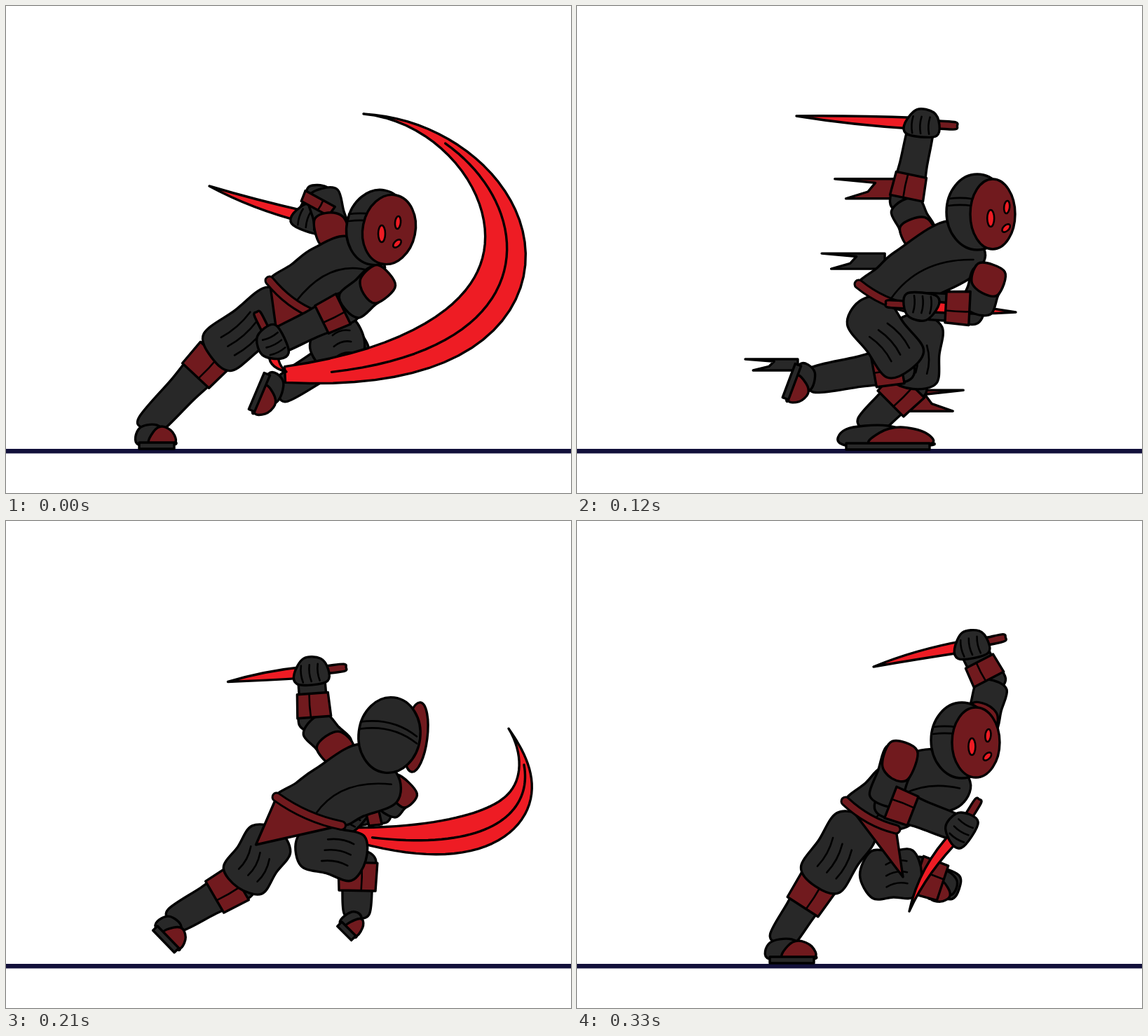
Write an HTML page with a canvas that moves like this. It is 806 by 695 pixels and loops after 0.36 s.

```html
<!DOCTYPE html>
<html lang="en">
<head>
<meta charset="utf-8">
<title>Running slash</title>
<style>
html, body { margin: 0; width: 806px; height: 695px; overflow: hidden; background: #fff; }
canvas { display: block; }
</style>
</head>
<body>
<canvas id="stage" width="806" height="695"></canvas>
<script>
const ctx = document.getElementById('stage').getContext('2d');
const STEP = 30;
const DARK = '#282828', MAROON = '#711a1e', RED = '#ee1c24';

// Joints of each key pose.
// head: centre, mask width, tilt    body: belt back, belt front, back, chest
// arms: shoulder, elbow, hand, blade tip    legs: hip, knee, heel, toe
// slash: where the trail begins on its arc, half width
const lunge = {
  head: [535, 316, 75, .2], body: [[376, 392], [440, 440], [438, 346], [515, 395]], sash: [385, 458],
  raised: [[468, 328], [452, 268], [433, 303], [290, 257]],
  low: [[535, 390], [490, 428], [380, 482], [400, 522]],
  legA: [[390, 428], [302, 494], [190, 628], [240, 628]],
  legB: [[450, 486], [500, 480], [372, 525], [350, 577]],
  slash: [0, 34], smear: 0
};
const stride = {
  head: [550, 335, 82, .2], body: [[380, 395], [470, 430], [440, 340], [525, 400]], sash: [402, 496],
  raised: [[475, 328], [442, 290], [420, 192], [293, 106]],
  low: [[546, 400], [515, 448], [405, 412], [383, 552]],
  legA: [[388, 428], [335, 494], [225, 507], [197, 560]],
  legB: [[452, 462], [500, 486], [551, 614], [624, 602]],
  slash: [.64, 15], smear: 0
};
const pass = {
  head: [576, 294, 64, 0], body: [[402, 397], [478, 432], [455, 350], [565, 385]], sash: [440, 425],
  raised: [[490, 328], [468, 284], [492, 168], [313, 157]],
  low: [[588, 382], [570, 432], [491, 428], [626, 437]],
  legA: [[412, 435], [468, 510], [315, 512], [297, 560]],
  legB: [[488, 455], [480, 535], [384, 629], [503, 629]],
  slash: [1, 0], smear: 1
};
const sweep = {
  head: [547, 302, 36, .2], body: [[382, 390], [485, 432], [432, 350], [555, 400]], sash: [318, 442],
  raised: [[476, 326], [438, 300], [433, 250], [296, 199]],
  low: [[560, 382], [540, 400], [500, 410], [490, 420]],
  legA: [[420, 461], [508, 463], [398, 537], [362, 588]],
  legB: [[372, 455], [295, 499], [191, 626], [259, 626]],
  slash: [0, 40], smear: 0
};
const reach = {
  head: [557, 309, 28, .05], body: [[390, 398], [472, 437], [450, 358], [560, 402]], sash: [395, 482],
  raised: [[475, 330], [443, 280], [437, 180], [337, 260]],
  low: [[570, 382], [540, 415], [490, 425], [480, 440]],
  legA: [[440, 460], [496, 500], [553, 614], [629, 603]],
  legB: [[385, 452], [380, 528], [234, 537], [227, 600]],
  slash: [.86, 11], smear: 0
};
const plant = {
  head: [564, 308, 49, 0], body: [[374, 411], [478, 437], [442, 335], [515, 390]], sash: [330, 456],
  raised: [[478, 315], [480, 270], [522, 190], [387, 208]],
  low: [[533, 388], [525, 446], [569, 420], [607, 518]],
  legA: [[412, 447], [455, 505], [367, 629], [524, 629]],
  legB: [[420, 490], [400, 530], [302, 530], [310, 586]],
  slash: [1, 0], smear: 1
};
const crouch = {
  head: [554, 313, 68, 0], body: [[383, 400], [455, 440], [440, 348], [548, 405]], sash: [465, 508],
  raised: [[575, 295], [592, 235], [562, 177], [423, 208]],
  low: [[463, 330], [438, 398], [547, 440], [474, 557]],
  legA: [[398, 435], [347, 512], [275, 627], [338, 627]],
  legB: [[420, 505], [480, 503], [520, 500], [500, 535]],
  slash: [1, 0], smear: 0
};

const mix = (a, b, t = .5) => typeof a === 'number' ? a + (b - a) * t
  : Array.isArray(a) ? a.map((v, i) => mix(v, b[i], t))
  : Object.fromEntries(Object.keys(a).map(k => [k, mix(a[k], b[k], t)]));

const steps = [
  lunge, mix(lunge, stride), stride, mix(stride, pass), pass, crouch,
  sweep, mix(sweep, reach), reach, mix(reach, plant), plant, crouch
];

// Cubic arcs of the two cuts, one for each half of the loop.
const arcs = [
  [[510, 154], [725, 170], [870, 505], [398, 526]],
  [[482, 193], [709, 152], [923, 510], [487, 446]]
];

const distance = (a, b) => Math.hypot(b[0] - a[0], b[1] - a[1]);

// Local axes along a→b: at(along, across) gives a point in pixels.
function frame(a, b) {
  const length = distance(a, b) || 1;
  const dx = (b[0] - a[0]) / length, dy = (b[1] - a[1]) / length;
  const at = (u, v = 0) => [a[0] + dx * u + dy * v, a[1] + dy * u - dx * v];
  return { length, dy, at };
}

function paint(path, fill, width = 3.4) {
  ctx.lineWidth = width;
  if (fill) { ctx.fillStyle = fill; ctx.fill(path); }
  ctx.stroke(path);
}

const polygon = (points, fill) => paint(new Path2D('M' + points.join('L') + 'Z'), fill);

function smooth(points, fill) {
  const n = points.length, p = i => points[(i + n) % n];
  const handle = (i, sign) => p(i).map((v, k) => v + sign * (p(i + 1)[k] - p(i - 1)[k]) / 6);
  const curves = points.map((_, i) => `C${handle(i, 1)} ${handle(i + 1, -1)} ${p(i + 1)}`);
  paint(new Path2D('M' + points[0] + curves.join('') + 'Z'), fill);
}

function line(a, control, b, width = 2.6) {
  paint(new Path2D(`M${a}Q${control} ${b}`), null, width);
}

function ellipse(x, y, rx, ry, tilt, fill, width) {
  const path = new Path2D();
  path.ellipse(x, y, rx, ry, tilt, 0, 7);
  paint(path, fill, width);
  return path;
}

function limb(a, b, wa, wb, fill = DARK) {
  const { at, length } = frame(a, b);
  smooth([at(0, wa), at(length * .5, (wa + wb) / 2), at(length, wb), at(length + wb * .35),
    at(length, -wb), at(length * .5, -(wa + wb) / 2), at(0, -wa), at(-wa * .5)], fill);
}

function band(a, b, from, to, w) {
  const { at } = frame(a, b);
  polygon([at(from, w), at(to, w - 2), at(to, 2 - w), at(from, -w)], MAROON);
  line(at(from, w * .2), at((from + to) / 2, w * .25), at(to, w * .2));
}

// Forked speed streak pointing sideways.
function streak([x, y], reach, half, fill) {
  polygon([[x, y - half], [x - reach, y - half], [x - reach * .45, y - half * .6], [x - reach * .55, y + half * .3],
    [x - reach * .85, y + half], [x, y + half]], fill);
}

function leg([hip, knee, heel, toe]) {
  const foot = frame(heel, toe), size = foot.length;
  const ankle = foot.at(size * .25, 28);
  limb(knee, ankle, 25, 18);
  smooth([foot.at(-1, 2), foot.at(0, 25), foot.at(size * .5, 30), foot.at(size * .9, 12), foot.at(size, 2)], DARK);
  smooth([foot.at(size * .3, 3), foot.at(size * .4, 20), foot.at(size * .65, 28),
    foot.at(size * .95, 20), foot.at(size, 4)], MAROON);
  polygon([foot.at(0, 5), foot.at(size, 5), foot.at(size, -4), foot.at(0, -4)], DARK);
  band(knee, ankle, 6, Math.min(46, distance(knee, ankle) * .7), 28);
  limb(hip, knee, 33, 33);
  const { at, length } = frame(hip, knee);
  for (const side of [-18, -2, 14]) {
    line(at(length * .35, side), at(length * .6, side + 8), at(length * .85, side + 4));
  }
}

function dagger(hand, tip) {
  const { at, length, dy } = frame(hand, tip);
  const bow = -18 * dy;
  limb(at(-48), at(0), 5, 6, MAROON);
  const side = w => `Q${at(length * .55, bow + w)} `;
  paint(new Path2D(`M${at(8, 8)}${side(7)}${at(length)}${side(-7)}${at(8, -8)}Z`), RED);
}

function fist(hand, tip) {
  const { at } = frame(hand, tip);
  smooth([at(24, 0), at(22, 15), at(0, 19), at(-22, 16), at(-25, 0), at(-16, -17), at(8, -20)], DARK);
  for (const u of [-11, 1, 13]) line(at(u, 14), at(u + 3, 2), at(u, -10));
}

function arm([shoulder, elbow, hand, tip]) {
  const reach = distance(elbow, hand);
  limb(elbow, hand, 22, 17);
  dagger(hand, tip);
  fist(hand, tip);
  limb(shoulder, elbow, 23, 22);
  band(elbow, hand, Math.min(10, reach * .2), Math.min(44, reach * .6), 24);
  const { at, length } = frame(shoulder, elbow);
  smooth([at(-10, 20), at(length * .45, 22), at(length * .55, 0), at(length * .35, -20), at(-10, -18)], MAROON);
}

function slash(arc, [from, width]) {
  if (width < 1) return;
  const point = t => {
    let p = arc;
    while (p.length > 1) p = p.slice(1).map((q, i) => mix(p[i], q, t));
    return p[0];
  };
  const edge = (side, start = 0, end = 1) => Array.from({ length: 41 }, (_, i) => {
    const s = start + (end - start) * i / 40, t = from + (1 - from) * s;
    return frame(point(t), point(t + .001)).at(0, side * width * Math.sin(2.8 * s ** 1.5));
  });
  polygon([...edge(1), ...edge(-1).reverse()], RED);
  if (width > 20) paint(new Path2D('M' + edge(.1, .2, .95).join('L')), null);
}

function torso({ head: [x, y], body: [beltBack, beltFront, back, chest], sash }) {
  polygon([beltBack, sash, beltFront], MAROON);
  smooth([beltBack, mix(beltBack, back, .5), back, [x - 46, y + 13], [x + 5, y + 54], chest,
    mix(chest, beltFront, .6), beltFront, mix(beltBack, beltFront)], DARK);
  line(mix(beltBack, beltFront, .6), mix(back, chest, .3), mix(chest, [x - 10, y + 45], .5));
  const sag = mix(beltBack, beltFront);
  const belt = new Path2D(`M${beltBack}Q${[sag[0] - 4, sag[1] + 10]} ${beltFront}`);
  paint(belt, null, 15);
  ctx.strokeStyle = MAROON;
  paint(belt, null, 9);
  ctx.strokeStyle = '#000';
}

function head([x, y, maskWidth, tilt]) {
  const away = maskWidth < 45;
  const rx = maskWidth / 2, cx = x + 49 - rx;
  const hood = () => {
    ellipse(x - 5, y, 44, 54, tilt, DARK);
    for (const dy of [-22, -12]) line([x - 46, y + dy + 3], [x, y + dy - 3], [x + 34, y + dy + 24]);
  };
  if (!away) hood();
  const mask = ellipse(cx, y + 3, rx, 50, tilt, MAROON);
  if (away) return hood();
  ctx.save();
  ctx.clip(mask);
  const gaze = cx + (70 - maskWidth) * .7;
  ellipse(gaze - 7, y + 9, 5, 12, 0, RED, 2.6);
  ellipse(gaze + 16, y - 7, 4, 9, .1, RED, 2.6);
  ellipse(gaze + 15, y + 23, 4, 7, .8, RED, 2.6);
  ctx.restore();
}

function smears({ raised, body, legA, legB, smear }) {
  if (!smear) return;
  const [rear, front] = legA[2][1] < legB[2][1] ? [legA, legB] : [legB, legA];
  const shin = mix(front[1], front[2], .3);
  streak(mix(raised[1], raised[2], .2), 105 * smear, 14, MAROON);
  streak(mix(body[0], body[2], .7), 90 * smear, 11, DARK);
  streak(rear[2], 75 * smear, 8, DARK);
  streak(shin, -100 * smear, 15, MAROON);
}

function render(time) {
  const step = Math.floor(time / STEP) % steps.length;
  const pose = steps[step];
  const turnedAway = pose.head[2] < 45;
  ctx.fillStyle = '#fff';
  ctx.fillRect(0, 0, 806, 695);
  ctx.fillStyle = '#12103a';
  ctx.fillRect(0, 632, 806, 6.5);
  ctx.lineJoin = ctx.lineCap = 'round';
  ctx.strokeStyle = '#000';
  smears(pose);
  leg(pose.legB);
  slash(arcs[step < 6 ? 0 : 1], pose.slash);
  arm(pose.raised);
  if (turnedAway) arm(pose.low);
  leg(pose.legA);
  torso(pose);
  head(pose.head);
  if (!turnedAway) arm(pose.low);
}

const start = performance.now();
function tick() {
  render(performance.now() - start);
  requestAnimationFrame(tick);
}
tick();
</script>
</body>
</html>
```
